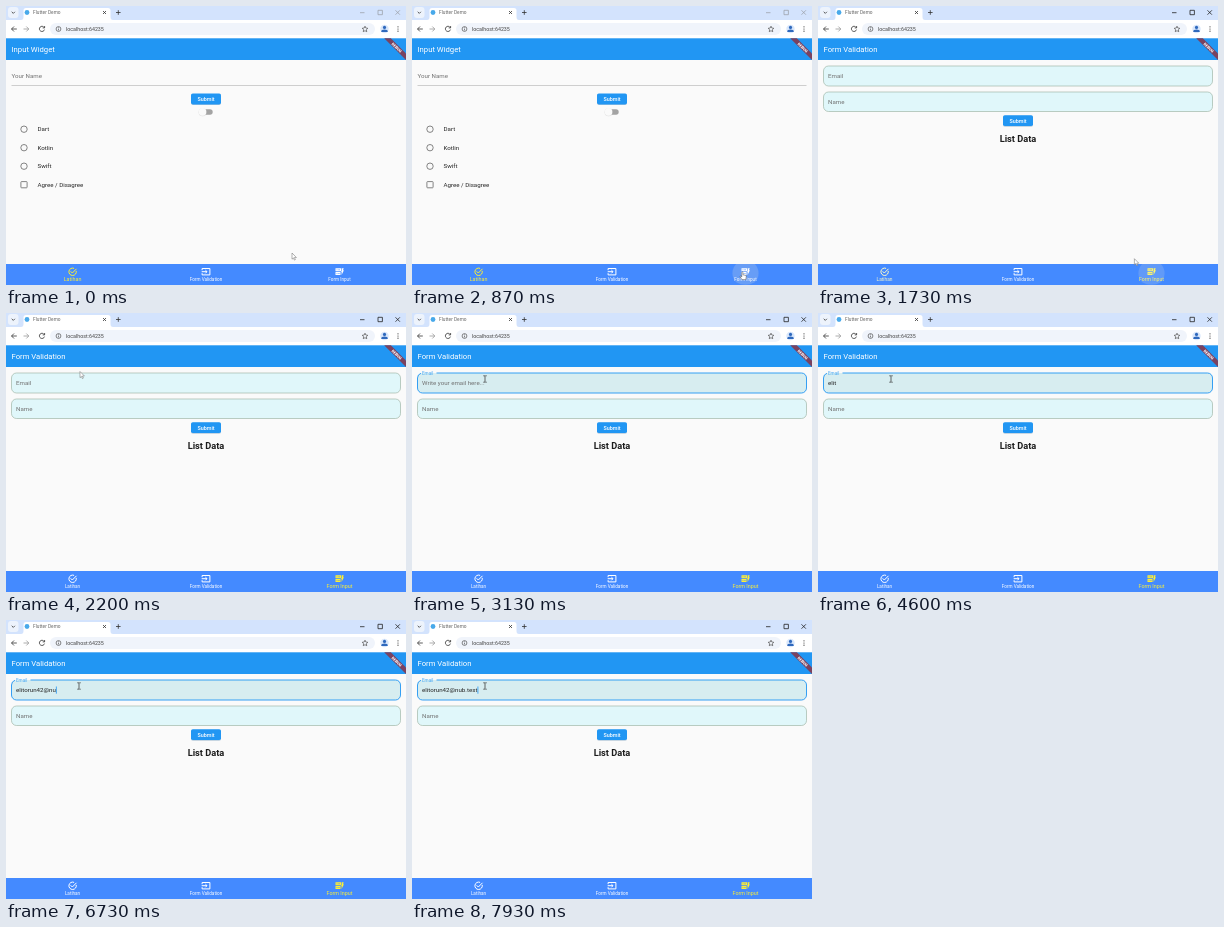
Animation, 400 px wide and 279 px high, one loop 8000 ms. Source, as an HTML page:

```html
<!DOCTYPE html>
<html lang="en">
<head>
<meta charset="utf-8">
<title>Form demo</title>
<style>
  html, body { margin: 0; width: 100%; height: 100%; overflow: hidden; }
  svg { display: block; width: 100%; height: 100%; }
  text { font-family: Roboto, Arial, sans-serif; white-space: pre; }
  .mid { text-anchor: middle; }
  .line { fill: none; stroke: currentColor; }
  .body { font-size: 6.16px; fill: #222; }
  .muted { font-size: 6.16px; fill: #707070; }
  .nav text { font-size: 4.62px; }
</style>
</head>
<body>
<svg viewBox="0 0 400 279">
  <defs>
    <g id="submit">
      <rect x="185" y="88" width="30" height="11" rx="1.8" fill="#1b5f96" opacity=".3"/>
      <rect x="185" y="87.5" width="30" height="10.9" rx="1.8" fill="#2196f3"/>
      <text class="mid" x="200" y="94.9" font-size="5.4" font-weight="500" fill="#fff">Submit</text>
    </g>
  </defs>

  <rect width="400" height="279" fill="#fafafa"/>

  <!-- Browser window -->
  <rect width="400" height="14" fill="#d3e3fd"/>
  <rect y="14" width="400" height="18.3" fill="#fff"/>
  <rect x="2" y="1" width="10.5" height="11" rx="3" fill="#edf3fc"/>
  <path d="M15 14q2.5 0 2.5-3V4.500q0-2.500 2.500-2.500h82q2.500 0 2.500 2.500V11q0 3 2.500 3z" fill="#fff"/>
  <circle cx="21" cy="6.500" r="2.400" fill="#48a9ea"/>
  <text x="27" y="8.400" font-size="4.800" fill="#666">Flutter Demo</text>
  <g class="line" color="#333" stroke-width=".8">
    <path d="M5.700 5.800l1.600 1.600 1.600-1.600M97 5l3 3m0-3l-3 3M110 6.500h4.600m-2.300-2.300v4.600"/>
    <path d="M10.800 23H5.600m2.400-2.500L5.500 23l2.500 2.500"/>
    <path d="M17.500 23h5.200m-2.400-2.500l2.500 2.500-2.500 2.500" stroke="#999"/>
    <path d="M38.200 21.500a2.600 2.600 0 1 0 .3 2.100M38.600 20v1.900h-1.900"/>
  </g>
  <g id="windowButtons" class="line" stroke-width=".8">
    <path d="M354 6.700h4.500M372 4.300h4.400v4.400H372zM389.500 4.300l4.400 4.400m0-4.400l-4.400 4.400"/>
  </g>
  <rect x="44" y="17" width="325" height="12" rx="6" fill="#f0f4fb"/>
  <g class="line" color="#444" stroke-width=".65">
    <circle cx="52.500" cy="23" r="2.400"/>
    <path d="M52.500 22.600v1.800m0-3v.6"/>
    <path d="M359 20.200l.85 1.850 2 .25-1.480 1.400.38 2-1.750-1-1.750 1 .38-2-1.480-1.400 2-.25z"/>
  </g>
  <text x="60" y="24.900" font-size="5.300" fill="#444">localhost:64235</text>
  <circle cx="378.500" cy="23" r="4.200" fill="#d9e7fb"/>
  <g fill="#2f69bd"><circle cx="378.500" cy="21.400" r="1.600"/><path d="M375.300 26v-.8q0-1.700 3.200-1.700t3.200 1.700v.8z"/></g>
  <g fill="#333"><circle cx="392" cy="20.800" r=".6"/><circle cx="392" cy="23" r=".6"/><circle cx="392" cy="25.200" r=".6"/></g>

  <!-- App bar -->
  <rect y="32.300" width="400" height="21.700" fill="#2196f3"/>
  <text id="title" x="5.500" y="46.300" font-size="7.700" fill="#fff"></text>
  <path d="M378.200 32.300h6.600L400 47.500v6.600z" fill="#7a4260"/>
  <text class="mid" transform="translate(390.700 41.600) rotate(45)" y="1.400" font-size="3.900" font-weight="900" fill="#fff">DEBUG</text>

  <g id="inputPage">
    <text class="muted" x="5.500" y="72.200">Your Name</text>
    <path d="M5.500 79.500h389" stroke="#a0a0a0" stroke-width=".5"/>
    <use href="#submit"/>
    <rect x="194" y="103.300" width="12.700" height="5.400" rx="2.700" fill="#a3a3a3"/>
    <circle cx="196.600" cy="106.200" r="4" fill="#aaa" opacity=".35"/>
    <circle cx="196.600" cy="105.900" r="3.800" fill="#fafafa"/>
    <g id="choices"></g>
    <rect class="line" x="14.900" y="175.600" width="6.200" height="6.200" rx=".6" color="#666" stroke-width=".8"/>
    <text class="body" x="31.500" y="180.900">Agree / Disagree</text>
  </g>

  <g id="formPage">
    <rect id="emailFill" x="5.500" y="60" width="389" height="20" rx="5"/>
    <path id="emailBorder" fill="none"/>
    <rect x="5.500" y="86" width="389" height="19.500" rx="5" fill="#e0f7fa" stroke="#96ad9c" stroke-width=".6"/>
    <text id="emailLabel">Email</text>
    <text id="hint" class="muted" x="10" y="72.300">Write your email here...</text>
    <text id="typed" class="body" x="10" y="72.300"></text>
    <path id="caret" stroke="#2196f3" stroke-width=".8"/>
    <text class="muted" x="10" y="97.900">Name</text>
    <use href="#submit" y="21.700"/>
    <text class="mid" x="200" y="136" font-size="9.240" font-weight="700" fill="#1c1c1c">List Data</text>
  </g>

  <!-- Bottom navigation -->
  <rect y="258" width="400" height="21" fill="#448aff"/>
  <path id="ink" d="M324.200 258h18.600a13 13 0 0 1 0 18.300q-9.300 5-18.600 0a13 13 0 0 1 0-18.300z" fill="#cdd3dc"/>
  <g class="nav" id="navFirst" transform="translate(66.500 265.700)">
    <path class="line" stroke-width="1" d="M3.700-.8A3.700 3.700 0 1 1 1.600-3.300M-1.900-.4L-.2 1.300 4-2.900"/>
    <text class="mid" y="9.500" fill="currentColor">Latihan</text>
  </g>
  <g class="nav" color="#fff" transform="translate(200 265.700)">
    <path class="line" stroke-width="1" d="M-3.900-1.500V-3.200H3.900V3.200H-3.900V1.500M-4.300 0H.9M-.6-1.600L1 0-.6 1.600"/>
    <text class="mid" y="9.500" fill="currentColor">Form Validation</text>
  </g>
  <g class="nav" id="navLast" transform="translate(333.500 265.700)">
    <path fill="currentColor" d="M-4-3.400H1.500V-.4H-4zM-4 .3H1V3.300H-4zM2.100-3.400H4.200L3.500-1.400H4.400L2.100 3.300V.2H1.700V-.4H2.100z"/>
    <path d="M-3-1.900H-2m.7 0H.5M-3 1.800H-2m.7 0H.2" stroke="#448aff" stroke-width=".6"/>
    <text class="mid" y="9.500" fill="currentColor">Form Input</text>
  </g>

  <g id="pointer" stroke-linejoin="round">
    <path id="arrow" d="M0 0v6.200l1.400-1.300 1 2.200 1-.5-1-2.100h2z" fill="#fff" stroke="#666" stroke-width=".5"/>
    <path id="hand" d="M-.6.500q.6-1 1.200 0V3l2.600.5q.8.200.7 1.200L3.400 7.800H-.4L-2.500 4.700q.5-.9 1.900.3z" fill="#fff" stroke="#444" stroke-width=".5"/>
    <path id="beam" d="M-1.700-3.200H-.4L0-2.800.4-3.200H1.700M0-2.800V2.800M-1.700 3.200H-.4L0 2.800.4 3.200H1.700" fill="none" stroke="#333" stroke-width=".75"/>
  </g>
</svg>
<script>
const LOOP = 8000, PRESS = 1530, OPEN = 1600, FOCUS = 2530;
const EMAIL = 'elitorun42@nub.test';
const el = id => document.getElementById(id);
const set = (id, attrs) => {
  for (const key in attrs) el(id).setAttribute(key, attrs[key]);
};
const show = (id, on) => set(id, { opacity: +on });
const ramp = (t, from, to) => Math.min(1, Math.max(0, (t - from) / (to - from)));
const ease = x => x * x * (3 - 2 * x);
const mix = (a, b, k) => a + (b - a) * k;

el('choices').innerHTML = ['Dart', 'Kotlin', 'Swift'].map((name, i) => {
  const y = 123.2 + i * 18.5;
  return `<circle class="line" cx="18" cy="${y}" r="3.200" color="#666" stroke-width=".8"/>
    <text class="body" x="31.500" y="${y + 2.1}">${name}</text>`;
}).join('');

// Moment at which each character is typed
const keyTime = i =>
  i < 4 ? 3950 + i * 175 : i < 13 ? 4800 + (i - 4) * 235 : 6900 + (i - 13) * 190;

// Time, x and y of the pointer's resting points
const stops = [[0, 286, 247], [70, 286, 247], [1070, 335.5, 268],
  [1640, 335.5, 268], [2190, 74, 58.5], [2270, 74, 58.5], [2400, 73, 66], [LOOP, 73, 66]];

function pointerAt(t) {
  const i = stops.findIndex((stop, n) => n && t <= stop[0]);
  const [from, to] = [stops[i - 1], stops[i]];
  const k = ease(ramp(t, from[0], to[0]));
  return [mix(from[1], to[1], k), mix(from[2], to[2], k)];
}

function drawPointer(t) {
  const [x, y] = pointerAt(t);
  const inEmail = t > OPEN && y > 60 && y < 80;
  const inField = inEmail || (t > OPEN && y > 86 && y < 105.5);
  const inNav = y > 258;
  set('pointer', { transform: `translate(${x} ${y})` });
  show('beam', inField);
  show('hand', inNav);
  show('arrow', !inField && !inNav);
  set('emailFill', { fill: inEmail ? '#d7edf0' : '#e0f7fa' });
  const strength = t >= PRESS ? 0.45 : inNav ? 0.25 : 0;
  set('ink', { opacity: strength * (1 - ramp(t, OPEN, 1850)) });
}

function drawNavItem(id, selected) {
  set(id, { color: `rgb(255,${mix(255, 240, selected)},${mix(255, 50, selected)})` });
  el(id).querySelector('.mid').style.fontSize = mix(4.62, 5.39, selected) + 'px';
}

function drawEmail(t) {
  const focus = ease(ramp(t, FOCUS, FOCUS + 170));
  const focused = t >= FOCUS;
  const gap = 14 * focus;
  const count = [...EMAIL].filter((_, i) => t >= keyTime(i)).length;
  set('emailBorder', {
    d: `M${10.5 + gap} 60H389.500a5 5 0 0 1 5 5V75a5 5 0 0 1-5 5H10.500a5 5 0 0 1-5-5V65a5 5 0 0 1 ${focused ? 3.5 : 5}-${focused ? 4.7 : 5}`,
    stroke: focused ? '#2196f3' : '#96ad9c',
    'stroke-width': focused ? 0.9 : 0.6
  });
  set('emailLabel', {
    x: 10, y: mix(72.3, 61.7, focus), 'font-size': mix(6.16, 4.62, focus),
    fill: focused ? '#48a8f4' : '#707070'
  });
  set('hint', { opacity: count ? 0 : focus });
  el('typed').textContent = EMAIL.slice(0, count);
  const caretX = 10.5 + (count ? el('typed').getComputedTextLength() : 0);
  set('caret', { d: `M${caretX} 66.500v7.200` });
  show('caret', focused && (t - 650) % 1000 < 470);
}

function draw(now) {
  const t = now % LOOP;
  const opened = t >= OPEN;
  const selected = ease(ramp(t, OPEN, OPEN + 200));
  el('title').textContent = opened ? 'Form Validation' : 'Input Widget';
  show('inputPage', !opened);
  show('formPage', opened);
  set('windowButtons', { color: t < PRESS ? '#9da3ab' : '#222' });
  drawNavItem('navFirst', 1 - selected);
  drawNavItem('navLast', selected);
  drawEmail(t);
  drawPointer(t);
}

const start = performance.now();
function tick() {
  draw(performance.now() - start);
  requestAnimationFrame(tick);
}
tick();
</script>
</body>
</html>
```
